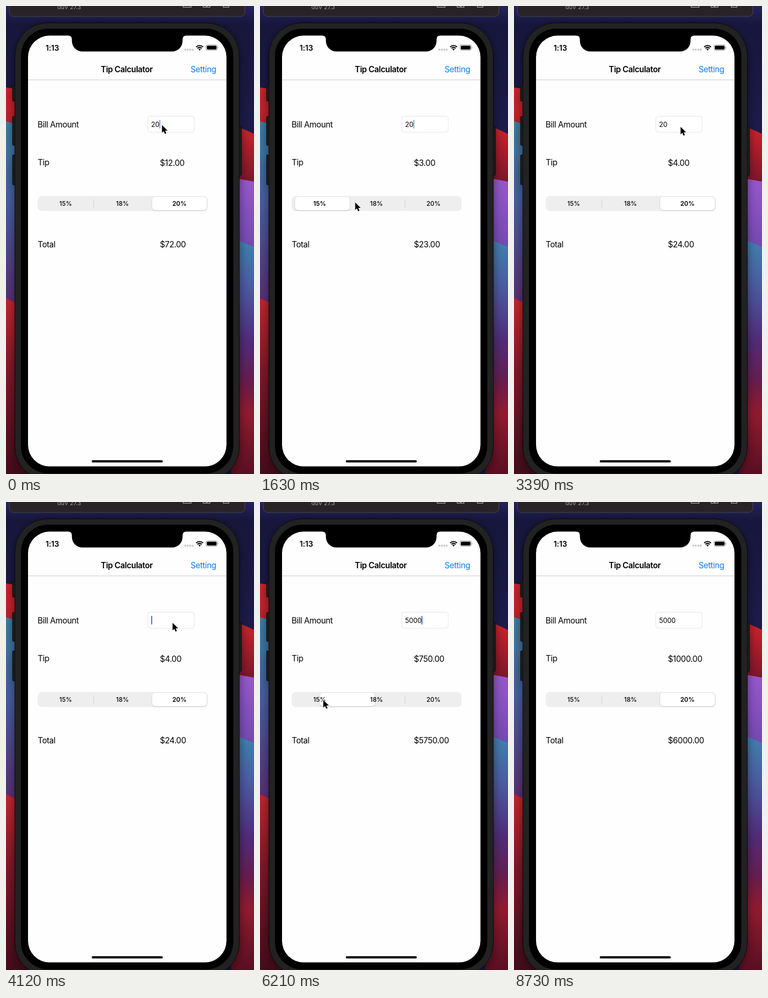
An HTML page for the animation above (8.83 s loop, 473 by 890 pixels).

```html
<!DOCTYPE html>
<html lang="en">
<head>
<meta charset="utf-8">
<title>Tip Calculator</title>
<style>
  html, body { margin: 0; width: 100%; height: 100%; overflow: hidden; background: #17163f; }
  svg { display: block; width: 473px; height: 890px; }
  text { font-family: Inter, "Liberation Sans", sans-serif; fill: #000; }
  .body { font-size: 15.5px; letter-spacing: -.4px; }
  .bold { font-weight: 600; }
  .input { font-size: 12.8px; letter-spacing: -.1px; }
  .seg { font-size: 11.9px; font-weight: 500; text-anchor: middle; }
  .seg.on { font-weight: 600; }
  .menu text { font-size: 13px; fill: #fff; text-anchor: middle; }
</style>
</head>
<body>
<svg viewBox="0 0 473 890">
  <defs>
    <linearGradient id="night" x2="0" y2="1">
      <stop offset="0" stop-color="#25235c"/><stop offset=".15" stop-color="#17163c"/><stop offset="1" stop-color="#1d1b49"/>
    </linearGradient>
    <linearGradient id="redL" x2="0" y2="1">
      <stop offset="0" stop-color="#cf242b"/><stop offset="1" stop-color="#b5202b"/>
    </linearGradient>
    <linearGradient id="blueL" x2="0" y2="1">
      <stop offset="0" stop-color="#3c82a4"/><stop offset=".45" stop-color="#475c9c"/><stop offset="1" stop-color="#582c70"/>
    </linearGradient>
    <linearGradient id="wineL" x2="0" y2="1">
      <stop offset="0" stop-color="#c2252d"/><stop offset=".4" stop-color="#801828"/><stop offset="1" stop-color="#430c1c"/>
    </linearGradient>
    <linearGradient id="redR" x2="0" y2="1">
      <stop offset="0" stop-color="#d0242c"/><stop offset="1" stop-color="#7a152a"/>
    </linearGradient>
    <linearGradient id="violet" x2="0" y2="1">
      <stop offset="0" stop-color="#9758cc"/><stop offset="1" stop-color="#7148b0"/>
    </linearGradient>
    <linearGradient id="blueR" x2="0" y2="1">
      <stop offset="0" stop-color="#3f83ae"/><stop offset=".35" stop-color="#4c58a0"/><stop offset=".7" stop-color="#502c78"/><stop offset="1" stop-color="#681c4c"/>
    </linearGradient>
    <linearGradient id="wineR" x2="0" y2="1">
      <stop offset="0" stop-color="#681c4c"/><stop offset=".35" stop-color="#921a30"/><stop offset="1" stop-color="#5a0f22"/>
    </linearGradient>
    <filter id="soft" x="-10%" y="-20%" width="120%" height="150%">
      <feDropShadow dx="0" dy="1.2" stdDeviation="1.3" flood-opacity=".16"/>
    </filter>
    <filter id="shade" x="-10%" y="-10%" width="120%" height="120%">
      <feDropShadow dx="0" dy="6" stdDeviation="9" flood-opacity=".45"/>
    </filter>
  </defs>

  <!-- wallpaper -->
  <rect width="473" height="240" fill="url(#night)"/>
  <path d="M0 155L40 160V240H0Z" fill="url(#redL)"/>
  <path d="M0 219L40 232V575H0Z" fill="url(#blueL)"/>
  <path d="M0 556L40 574V890H0Z" fill="url(#wineL)"/>
  <path d="M430 224L473 243V340H430Z" fill="url(#redR)"/>
  <path d="M430 326L473 334V470H430Z" fill="url(#violet)"/>
  <path d="M430 441L473 458V720H430Z" fill="url(#blueR)"/>
  <path d="M430 712H473V890H430Z" fill="url(#wineR)"/>

  <!-- window bar -->
  <rect x="6.5" y="-20" width="449" height="40" rx="8" fill="#282327" stroke="#4b464b"/>
  <text x="98" y="6" style="font-size:11px;fill:#a29da1">duV 27.3</text>
  <g fill="none" stroke="#aaa5a9" stroke-width="1.3">
    <path d="M338 -3V2.3H353V-3M376 -3V2.3H389V-3M414.5 -3V2.3H425V-3"/>
    <path d="M380.5 -1.5a2.2 2.2 0 0 0 4.4 0"/>
  </g>

  <!-- phone -->
  <g fill="#1b1b1d" stroke="#0b0b0c" filter="url(#shade)">
    <rect x="12.5" y="151" width="8" height="30" rx="2"/>
    <rect x="12.5" y="210" width="8" height="55" rx="2"/>
    <rect x="12.5" y="283" width="8" height="57" rx="2"/>
    <rect x="441" y="230" width="8" height="92" rx="2"/>
    <rect x="17" y="32" width="428" height="869" rx="63" fill="#202022"/>
  </g>
  <rect x="28.5" y="43" width="405" height="846" rx="52"/>
  <rect x="42" y="56.3" width="378.5" height="819.2" rx="41" fill="#fefefe"/>
  <path d="M119 55.5V56.3Q125.7 56.5 125.7 63.5V66.5A20 20 0 0 0 145.700 86.500H316.700A20 20 0 0 0 336.700 66.500V63.500Q336.700 56.500 343.500 56.300V55.500Z"/>
  <rect x="163.5" y="863.7" width="135.5" height="4.4" rx="2.2"/>

  <!-- status bar -->
  <text class="bold" x="75.5" y="84.5" style="font-size:14.6px;letter-spacing:-.2px">1:13</text>
  <g fill="#bdbdbf">
    <circle cx="342" cy="83" r="1.8"/><circle cx="346.7" cy="83" r="1.8"/>
    <circle cx="351.4" cy="83" r="1.8"/><circle cx="356.1" cy="83" r="1.8"/>
  </g>
  <path d="M362.7 78a9.2 9.2 0 0 1 13 0M365.1 80.6a5.8 5.8 0 0 1 8.2 0" fill="none" stroke="#000" stroke-width="2.1"/>
  <path d="M369.2 84.8L366.9 82.3a3.3 3.3 0 0 1 4.6 0Z"/>
  <rect x="381.5" y="74" width="21.5" height="10.2" rx="3" fill="none" stroke="#8f8f91"/>
  <rect x="383" y="75.5" width="18.5" height="7.2" rx="1.7"/>
  <path d="M404 77.3q2 1.8 0 3.6Z" fill="#8f8f91"/>

  <!-- page -->
  <text class="body bold" x="180.8" y="126">Tip Calculator</text>
  <text class="body" x="352" y="126" style="fill:#0a7cf5">Setting</text>
  <path d="M42 140.5H420.5" stroke="#c9c9cb"/>
  <text class="body" x="60.3" y="230.8">Bill Amount</text>
  <text class="body" x="60.5" y="302.5">Tip</text>
  <text class="body" x="60.5" y="459">Total</text>
  <text class="body" id="tip" x="293.5" y="304"></text>
  <text class="body" id="total" x="293.5" y="459"></text>

  <rect x="270.5" y="209.5" width="88.5" height="30.5" rx="5" fill="#fff" stroke="#e4e4e6"/>
  <text class="input" id="bill" x="276.8" y="229.5"></text>
  <rect id="caret" y="216.5" width="1.9" height="16.5" rx=".8" fill="#3f62e2"/>

  <rect x="60.5" y="361.2" width="324" height="28.6" rx="7.5" fill="#eeeeef"/>
  <path id="sep0" d="M167.5 368V383" stroke="#d3d3d6"/>
  <path id="sep1" d="M276.5 368V383" stroke="#d3d3d6"/>
  <rect id="thumb" y="362.5" width="104.5" height="25.8" rx="6" fill="#fff" stroke="#000" stroke-opacity=".05" filter="url(#soft)"/>
  <text class="seg" x="113.8" y="380">15%</text>
  <text class="seg" x="222.2" y="380">18%</text>
  <text class="seg" x="330.8" y="380">20%</text>

  <g class="menu" id="menu">
    <path d="M190 166.5H395q8 0 8 8V192q0 8-8 8H301l-8 8-8-8H190q-8 0-8-8V174.5q0-8 8-8Z" fill="#222224"/>
    <path d="M249.5 167V200M337.5 167V200" stroke="#555558"/>
    <text x="216" y="188">Select</text>
    <text x="293.5" y="188">Select All</text>
    <text x="370" y="188">Paste</text>
  </g>

  <path id="cursor" d="M0 0V14.6L3.3 11.5L5.6 16.7L8.2 15.6L6 10.5H10.6Z" stroke="#fff" stroke-width="1.6" paint-order="stroke"/>
</svg>
<script>
const LOOP = 8830, STEP = 147.2, BLINK = 1000;
const RATES = [15, 18, 20];
const $ = id => document.getElementById(id);
const segs = document.querySelectorAll(".seg");

// pointer: step, x, y
const path = [
  [0, 297.5, 226.5], [1, 294, 238], [3, 232, 356], [4, 184, 404], [6, 134, 402],
  [8, 128, 380], [10, 134, 377], [11, 181.5, 373.5], [12, 216, 377], [14, 226, 378],
  [16, 322, 379], [19, 336, 379], [21, 326, 270], [22, 320, 222], [23, 317.7, 229.7],
  [37, 317.7, 229.7], [39, 254, 308], [41, 130, 374], [42, 120.7, 376.5], [45, 123, 377],
  [46, 190, 378], [48, 226, 378], [51, 350.7, 378.7], [54, 353, 380],
  [56, 408, 660], [57, 437, 812], [58, 449, 872], [59, 460, 910]
];
// segment taps: step, chosen segment
const taps = [[-9, 2], [8, 0], [13, 1], [17, 2], [40, 0], [46, 1], [51, 2]];
// field contents: step, text
const typed = [[0, "20"], [27, "2"], [28, ""], [32, "5"], [33, "50"], [34, "500"], [35, "5000"]];
const slide = [0, .25, .76, .98, 1];

const last = (list, n) => list.findLastIndex(k => k[0] <= n);
const money = v => "$" + v.toFixed(2);
const thumbX = i => 62.5 + 108 * i;
const show = (el, on) => el.setAttribute("opacity", +on);

function pointer(n) {
  const i = last(path, n), [a, x, y] = path[i], [b, u, v] = path[i + 1] || path[i];
  const k = b > a ? (n - a) / (b - a) : 0;
  return [x + (u - x) * k, y + (v - y) * k];
}

// solid while typing, otherwise fading in and out once per blink
function caretOpacity(n) {
  if (n >= 25 && n <= 38) return 1;
  const phase = (n * STEP + BLINK - (n < 25 ? 560 : 80)) % BLINK;
  return Math.max(0, Math.min(1, phase / 90, (540 - phase) / 150));
}

function draw(ms) {
  const n = Math.min(59, Math.floor(ms % LOOP / STEP + .06));

  // a tap takes effect one step after the press
  const i = last(taps, n - 1), [start, pick] = taps[i];
  const from = i ? taps[i - 1][1] : pick;
  const k = slide[Math.min(4, n - start)];
  $("thumb").setAttribute("x", thumbX(from) + (thumbX(pick) - thumbX(from)) * k);
  segs.forEach((s, j) => s.classList.toggle("on", j === pick && k > .9));
  show($("sep0"), pick === 2);
  show($("sep1"), pick === 0);

  const text = typed[last(typed, n)][1];
  $("bill").textContent = text;
  $("caret").setAttribute("x", 276.9 + 7.75 * text.length);
  show($("caret"), caretOpacity(n));
  show($("menu"), n === 25 || n === 26);

  // amounts refresh only on a tap
  const bill = n <= 8 ? 60 : n <= 40 ? 20 : 5000;
  const tip = bill * RATES[pick] / 100;
  $("tip").textContent = money(tip);
  $("total").textContent = money(bill + tip);

  $("cursor").setAttribute("transform", `translate(${pointer(n)})`);
}

const t0 = performance.now();
function tick() {
  draw(performance.now() - t0);
  requestAnimationFrame(tick);
}
tick();
</script>
</body>
</html>
```
